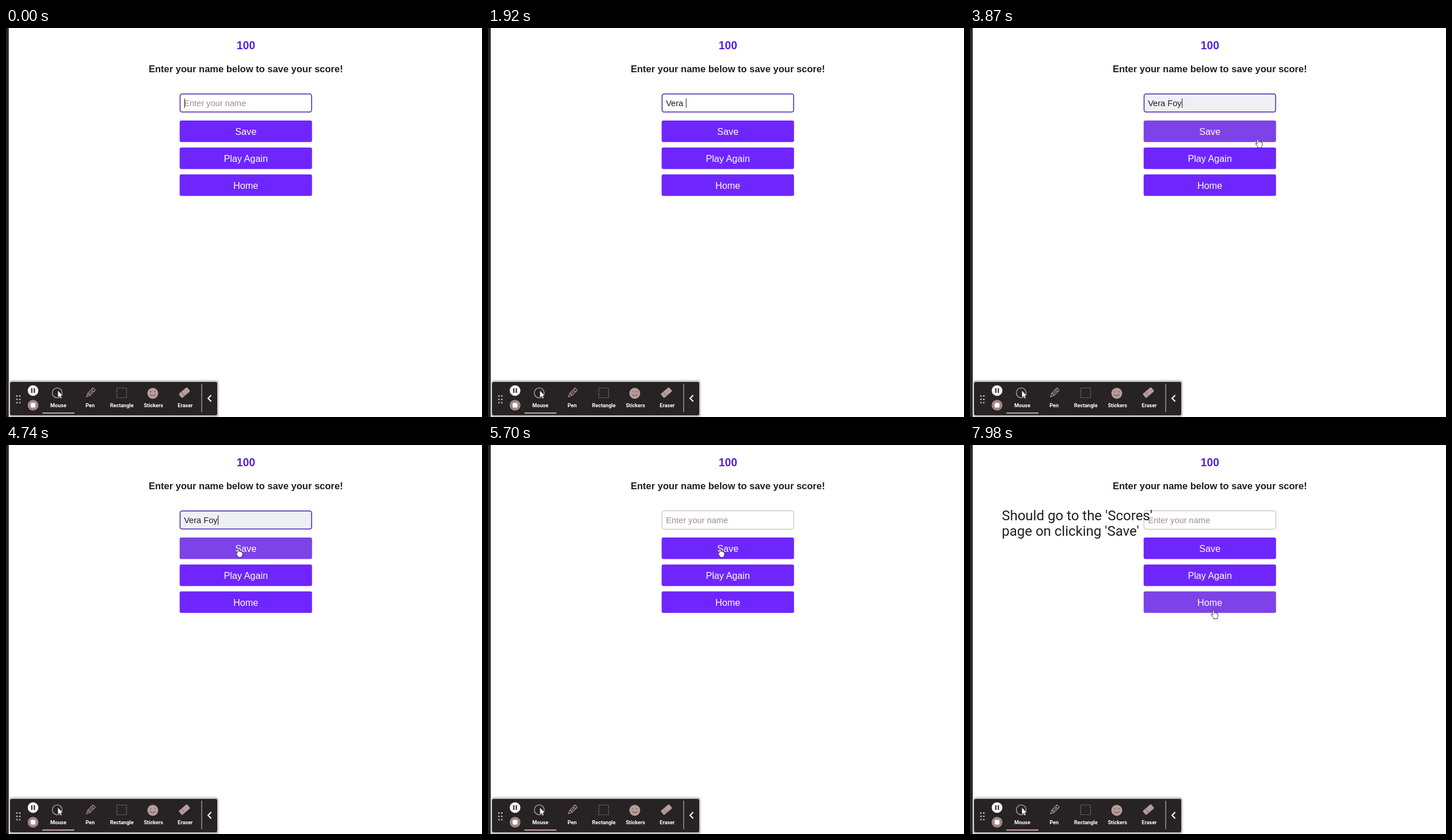
An HTML page that plays this animation: 827 by 677 pixels, repeating every 8000 ms.

```html
<!DOCTYPE html>
<html lang="en">
<head>
<meta charset="utf-8">
<title>Save your score</title>
<style>
  html, body { margin: 0; width: 100%; height: 100%; overflow: hidden; background: #fff; }
  svg { display: block; width: 827px; height: 677px; }
  text { white-space: pre; }
  .page { font-family: "Liberation Sans", Arial, sans-serif; }
  .mid { text-anchor: middle; }
  .field { font-size: 14.6px; }
  .button text { font-size: 16.2px; fill: #fff; }
  .note { font: 24px Roboto, sans-serif; fill: #231d1f; }
  .label { font: 700 9.1px Roboto, sans-serif; fill: #fff; text-anchor: middle; }
</style>
</head>
<body>
<svg viewBox="0 0 827 677">
  <defs>
    <filter id="glow" x="-5%" y="-25%" width="110%" height="150%">
      <feGaussianBlur stdDeviation="1.6"/>
    </filter>
  </defs>
  <rect width="827" height="677" fill="#fff"/>
  <rect width="4.8" height="677" fill="#2a2527"/>

  <g class="page">
    <text class="mid" x="416.8" y="37" font-size="19.3" font-weight="700" fill="#5a1fdc">100</text>
    <text class="mid" x="416.7" y="77" font-size="16.5" font-weight="700" fill="#231c1e">Enter your name below to save your score!</text>
    <rect id="box" rx="3.5"/>
    <text id="hint" class="field" x="309.2" y="136" fill="#a18a8b">Enter your name</text>
    <text id="typed" class="field" x="309.2" y="136" fill="#231c1e"></text>
    <rect id="caret" y="122.5" width="1" height="16.5" fill="#1c1618"/>
    <g id="buttons"></g>
  </g>

  <g id="note" class="note">
    <text x="55.2" y="131">Should go to the 'Scores'</text>
    <text x="55.2" y="157.6">page on clicking 'Save'</text>
  </g>

  <g id="toolbar">
    <rect x="6" y="613.5" width="363" height="64" rx="4" fill="#b9b4bb" filter="url(#glow)"/>
    <rect x="7" y="616" width="360" height="58" rx="3" fill="#272224"/>
    <g id="grip" fill="#cdb7b4"></g>
    <circle cx="47" cy="631" r="9.3" fill="#f3f0f0"/>
    <path d="M44.8 627v8M49.2 627v8" stroke="#272224" stroke-width="2"/>
    <circle cx="47" cy="656.5" r="9.3" fill="#b69c9a"/>
    <circle cx="47" cy="656.5" r="7.2" fill="none" stroke="#6d5958" stroke-width="1"/>
    <rect x="43.2" y="652.7" width="7.6" height="7.6" rx="1" fill="#fff"/>

    <circle cx="89" cy="635" r="8.6" fill="none" stroke="#c3aaa7" stroke-width="1.3"/>
    <path d="M90 630.5v13l3-2.6 2 4.3 2.2-1-2-4.2h3.8z" fill="#fff" stroke="#272224" stroke-width=".8"/>
    <rect x="63" y="669" width="56" height="2.2" rx="1" fill="#b79c9b"/>

    <g transform="translate(146.5 635) rotate(45)" fill="none" stroke="#b79c9b" stroke-width="1.1">
      <path d="M-2.8-9.5h5.6v13L0 9.5l-2.8-6zM-2.8-5.5h5.6M-2.8 3.5h5.6M0-5.5v9"/>
    </g>
    <rect x="192.5" y="626.5" width="17" height="17" fill="none" stroke="#927c7b" stroke-width="1.2" stroke-dasharray="2 1.4"/>
    <circle cx="255" cy="635.8" r="9.5" fill="#b79c9b"/>
    <path d="M250 633h3M257 633h3M250.5 637.5q4.5 5 9 0" fill="none" stroke="#6d5958" stroke-width="1.2"/>
    <g transform="translate(310 634.5) rotate(-40)">
      <rect x="-9.5" y="-4.7" width="19" height="9.4" rx="2" fill="#b79c9b"/>
      <path d="M-3.5-4.7v9.4" stroke="#8b7271"/>
    </g>
    <path d="M340 619v49.5" stroke="#d8cccb" stroke-width="1"/>
    <path d="M356.5 639l-5.4 5.5 5.4 5.5" fill="none" stroke="#fff" stroke-width="2.1"/>
  </g>

  <g id="cursor">
    <path id="arrow" d="M0 0v11l2.5-2.2 1.8 4 1.9-.9-1.8-3.8h3.3z" fill="#1a1517" stroke="#fff" stroke-width=".8"/>
    <path id="hand" fill="#fff" stroke="#2c2030" stroke-width=".9" stroke-linejoin="round"
      d="M-1.3 1Q-1.3-.4 0-.4T1.4 1V5Q2-.1 3.8 5.1Q5-.1 6 5.8Q7.8 4.7 8 7V9.5Q7.7 11.5 6.6 12.5V14.5H0V12.8L-3.3 8.6Q-4.6 6.4-2.8 6.6L-1.3 8z"/>
  </g>
</svg>

<script>
const LOOP = 8000;
const NAME = "Vera Foy";
const $ = id => document.getElementById(id);
const SVG = "http://www.w3.org/2000/svg";

function add(parent, tag, attrs, text = "") {
  const el = document.createElementNS(SVG, tag);
  for (const key in attrs) el.setAttribute(key, attrs[key]);
  el.textContent = text;
  parent.append(el);
  return el;
}
function set(el, attrs) {
  for (const key in attrs) el.setAttribute(key, attrs[key]);
}
const show = (el, on) => el.setAttribute("visibility", on ? "visible" : "hidden");

const buttons = ["Save", "Play Again", "Home"].map((label, i) => {
  const y = 161 + i * 46.9;
  const g = add($("buttons"), "g", { class: "button" });
  const face = add(g, "rect", { x: 301.7, y, width: 230, height: 37.5, rx: 3 });
  add(g, "text", { class: "mid", x: 416.7, y: y + 25 }, label);
  return { face, y };
});
["Mouse", "Pen", "Rectangle", "Stickers", "Eraser"].forEach((label, i) =>
  add($("toolbar"), "text", { class: "label", x: 91 + i * 55.1, y: 659.5 }, label));
for (let i = 0; i < 6; i++)
  add($("grip"), "circle", { cx: 19 + (i % 2) * 5, cy: 640.5 + (i >> 1) * 5.8, r: 1.4 });

// [time, letters shown]
const typing = [[0, 0], [990, 1], [1200, 2], [1350, 3], [1500, 4], [1920, 5],
  [2700, 8], [2970, 5], [3600, 8], [5160, 0]];
// Spans of time, [from, to]
const caretOn = [[0, 480], [930, 2370], [3660, 4170], [4680, 5160]];
const filled = [[2700, 2970], [3600, 5160]];
const cursorOn = [[2970, 6330], [7320, LOOP]];
const hovers = [
  [[3720, 5160], [6330, 7470]],
  [[7518, 7660]],
  [[7698, LOOP + 500]]
];
// [time, x, y] of the pointer tip
const path = [[3360, 632, 214], [3750, 516, 196], [4260, 403, 181],
  [7320, 403, 181], [7920, 423, 288]];

const within = (spans, t) => spans.some(([a, b]) => t >= a && t < b);
const latest = (steps, t) => steps.filter(s => s[0] <= t).pop()[1];
const clamp = v => Math.min(1, Math.max(0, v));
const mix = (a, b, k) => a + (b - a) * k;

function pointer(t) {
  const next = path.findIndex(p => p[0] > t);
  if (next < 1) return path[next < 0 ? path.length - 1 : 0].slice(1);
  const [t0, x0, y0] = path[next - 1], [t1, x1, y1] = path[next];
  const p = (t - t0) / (t1 - t0), k = p * p * (3 - 2 * p);
  return [mix(x0, x1, k), mix(y0, y1, k)];
}

function hoverLevel(spans, t) {
  return Math.max(...spans.map(([a, b]) =>
    Math.min(clamp((t - a) / 90), 1 - clamp((t - b) / 90))));
}

function draw(t) {
  const letters = latest(typing, t);
  const focused = t < 5160;
  const inset = focused ? 0.75 : 0.5;
  set($("box"), {
    x: 301.7 + inset, y: 114 + inset, width: 230 - 2 * inset, height: 33 - 2 * inset,
    fill: within(filled, t) ? "#eff0f6" : "#fff",
    stroke: focused ? "#4a22a6" : "#b9b4b7",
    "stroke-width": 2 * inset
  });
  show($("hint"), !letters);
  $("typed").textContent = NAME.slice(0, letters);
  show($("caret"), within(caretOn, t));
  $("caret").setAttribute("x", 309.7 + (letters ? $("typed").getComputedTextLength() : 0));

  buttons.forEach(({ face }, i) => {
    const k = hoverLevel(hovers[i], t);
    face.setAttribute("fill", `rgb(${mix(111, 125, k)},${mix(38, 66, k)},${mix(253, 232, k)})`);
  });
  show($("note"), t >= 6330);

  const [x, y] = pointer(t);
  const over = x > 301 && x < 532 && buttons.some(b => y >= b.y && y <= b.y + 37.5);
  const seen = within(cursorOn, t);
  $("cursor").setAttribute("transform", `translate(${x} ${y})`);
  show($("arrow"), seen && !over);
  show($("hand"), seen && over);
}

const start = performance.now();
function tick() {
  draw((performance.now() - start) % LOOP);
  requestAnimationFrame(tick);
}
tick();
</script>
</body>
</html>
```
